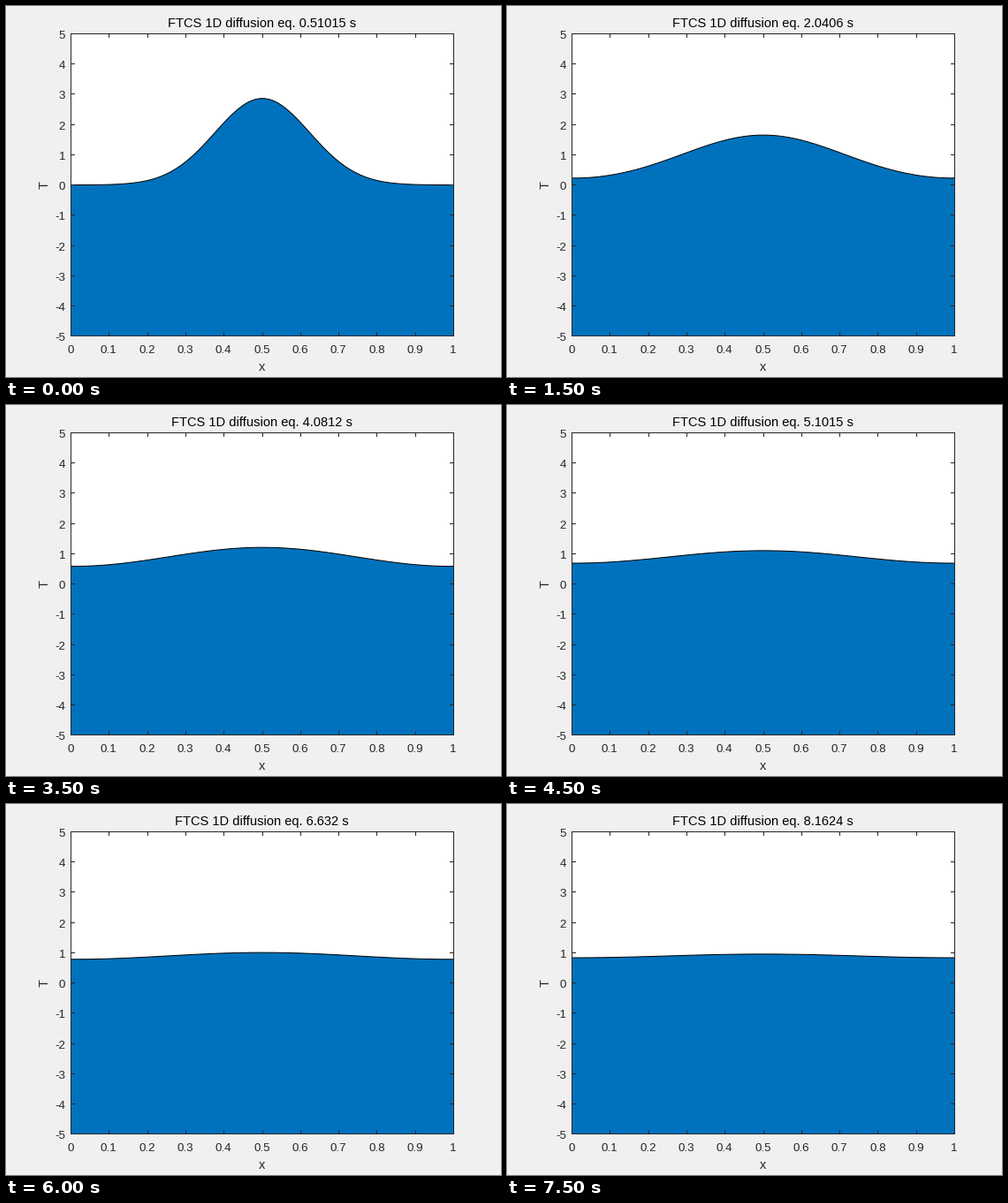
A matplotlib script that plays this animation: 560x420 px, repeating every 8 s.

```python
import numpy as np
import matplotlib.pyplot as plt
from matplotlib.animation import FuncAnimation

W, H, DPI = 560, 420, 100
PX = 72 / DPI  # points per pixel
LEFT, RIGHT, TOP, BOTTOM = 73.5, 506.5, 31.5, 373.5
FRAMES, STEPS = 16, 100
DARK = "#262626"

plt.rcParams["font.family"] = "Liberation Sans"

# Explicit diffusion scheme with zero-gradient ends
N, D = 100, 0.01
x = np.linspace(0, 1, N)
dx = x[1] - x[0]
dt = 0.5 * dx**2 / D


def solve():
    temp = 5 * np.exp(-((x - 0.5) ** 2) / 0.01)
    rows = []
    for _ in range(FRAMES):
        for _ in range(STEPS):
            temp[1:-1] += D * dt / dx**2 * (temp[2:] - 2 * temp[1:-1] + temp[:-2])
            temp[0], temp[-1] = temp[1], temp[-2]
        rows.append(temp.copy())
    return rows


def to_x(v):
    return LEFT + v * (RIGHT - LEFT)


def to_y(v):
    return BOTTOM + 0.2 - (v + 5) * (BOTTOM + 0.2 - TOP) / 10


def snap(v):
    return np.floor(v) + 0.5


fig = plt.figure(figsize=(W / DPI, H / DPI), dpi=DPI, facecolor="#f0f0f0")
ax = fig.add_axes([0, 0, 1, 1])
ax.set(xlim=(0, W), ylim=(H, 0))
ax.axis("off")


def line(xs, ys, color=DARK, z=4):
    return ax.plot(xs, ys, color=color, lw=PX, zorder=z, snap=False,
                   solid_capstyle="butt", solid_joinstyle="miter")[0]


def label(px, py, s, size=13.33, ha="center", color=DARK, **kw):
    return ax.text(px, py, s, fontsize=size * PX, ha=ha, va="baseline",
                   color=color, **kw)


ax.fill([LEFT, RIGHT, RIGHT, LEFT], [TOP, TOP, BOTTOM, BOTTOM],
        color="white", lw=0, zorder=1, snap=False)
area = ax.fill([0, 0, 0], [0, 0, 0], color="#0072bd", lw=0, zorder=2,
               snap=False)[0]
curve = line([], [], "black", 3)

edge = 0.5  # closes the frame's corners
line([LEFT - edge, RIGHT + edge], [TOP, TOP])
line([LEFT - edge, RIGHT + edge], [BOTTOM, BOTTOM])
line([LEFT, LEFT], [TOP, BOTTOM])
line([RIGHT, RIGHT], [TOP, BOTTOM])
for i in range(11):
    tx, ty = snap(to_x(i / 10)), snap(to_y(i - 5))
    line([tx, tx], [TOP, TOP + 4.5])
    line([tx, tx], [BOTTOM, BOTTOM - 4.5])
    line([LEFT, LEFT + 4.5], [ty, ty])
    line([RIGHT, RIGHT - 4.5], [ty, ty])
    label(to_x(i / 10) - 0.5, 393, f"{i / 10:g}")
    label(67, to_y(i - 5) + 5.5, str(i - 5), ha="right")

label(289.7, 413, "x", 14.67)
label(48, 202.5, "T", 14.67, rotation=90, rotation_mode="anchor")
title = label(289.5, 24, "", 14.67, color="black")

profiles = solve()
px = to_x(x)


def update(n):
    py = to_y(profiles[n])
    area.set_xy(np.column_stack([np.r_[LEFT, px, RIGHT],
                                 np.r_[BOTTOM, py, BOTTOM]]))
    curve.set_data(px, py)
    title.set_text(f"FTCS 1D diffusion eq. {(n + 1) * STEPS * dt:.5g} s")
    return area, curve, title


anim = FuncAnimation(fig, update, frames=FRAMES, interval=500,
                     repeat=True, repeat_delay=0)
plt.show()
```
